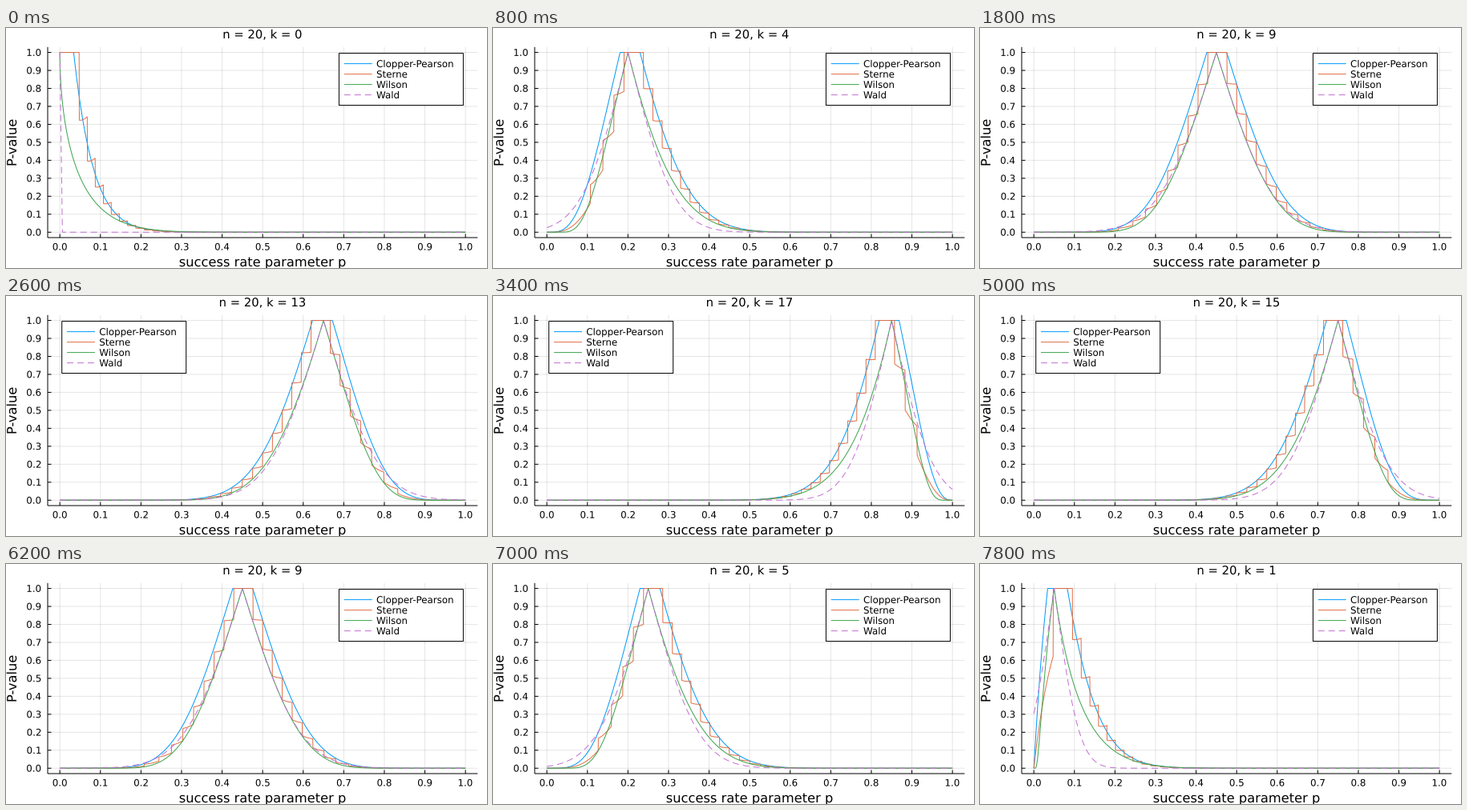
These frames come from a looping animation (600x300 px, 8000 ms). A matplotlib script:

```python
import math

import matplotlib.pyplot as plt
import numpy as np
from matplotlib.animation import FuncAnimation
from matplotlib.patches import PathPatch, Rectangle
from matplotlib.textpath import TextPath
from matplotlib.transforms import Affine2D

W, H, DPI = 600, 300, 100
N = 20
STEP_MS = 200
PX = 72 / DPI                       # points per pixel
DASH = (0, (8 * PX, 5 * PX))
LEFT, RIGHT, TOP, BOTTOM = 52, 588.3, 23.8, 262
TICK = 4.5
SMALL, TITLE, GUIDE = 11.84, 14.8, 16.28
LEGEND_LEFT, LEGEND_RIGHT = 69.7, 415.4
STYLES = [
    ("Clopper-Pearson", "#009AFA", "-"),
    ("Sterne", "#E36F47", "-"),
    ("Wilson", "#3DA44E", "-"),
    ("Wald", "#C371D2", DASH),
]

plt.rcParams.update({
    "path.snap": False,
    "lines.linewidth": PX,
    "lines.scale_dashes": False,
    "lines.solid_capstyle": "butt",
})

p = np.linspace(0, 1, 2001)
pmf = np.array([math.comb(N, j) * p**j * (1 - p) ** (N - j) for j in range(N + 1)])
erfc = np.vectorize(math.erfc)


def two_sided(k, var):
    """Normal two-sided P-value for k successes with the given variance."""
    with np.errstate(divide="ignore", invalid="ignore"):
        z = np.abs(k - N * p) / np.sqrt(var)
    return erfc(np.nan_to_num(z, nan=0.0, posinf=99.0) / math.sqrt(2))


def clopper_pearson(k):
    lower, upper = pmf[: k + 1].sum(axis=0), pmf[k:].sum(axis=0)
    return np.minimum(1, 2 * np.minimum(lower, upper))


def sterne(k):
    return np.where(pmf <= pmf[k] * (1 + 1e-9), pmf, 0).sum(axis=0)


def wilson(k):
    return two_sided(k, N * p * (1 - p))


def wald(k):
    if k in (0, N):                 # zero variance: a narrow spike
        return np.clip(1 - np.abs(p - k / N) / 0.00625, 0, 1)
    return two_sided(k, k * (1 - k / N))


def to_x(v):
    return LEFT + (v + 0.03) / 1.06 * (RIGHT - LEFT)


def to_y(v):
    return BOTTOM - (v + 0.03) / 1.06 * (BOTTOM - TOP)


METHODS = (clopper_pearson, sterne, wilson, wald)
curves = [[to_y(f(k)) for f in METHODS] for k in range(N + 1)]

fig = plt.figure(figsize=(W / DPI, H / DPI), dpi=DPI, facecolor="white")
page = fig.add_axes([0, 0, 1, 1])   # pixel coordinates, y down
page.set(xlim=(0, W), ylim=(H, 0))
page.axis("off")


def glyphs(x, y, text, size, align="center", angle=0):
    """Outline of a text with its baseline at y."""
    path = TextPath((0, 0), text, size=size, prop={"family": "DejaVu Sans"})
    ink = path.get_extents()
    anchor = {"left": 0, "center": (ink.x0 + ink.x1) / 2, "right": ink.x1}[align]
    place = Affine2D().translate(-anchor, 0).scale(1, -1).rotate_deg(-angle)
    return place.translate(x, y).transform_path(path)


def put(*args, **kw):
    return page.add_patch(PathPatch(glyphs(*args, **kw), fc="black", lw=0, zorder=5))


def stroke(xs, ys, color="black", **kw):
    return page.plot(xs, ys, color=color, **kw)[0]


# Grid, axes and labels
for v in np.arange(11) / 10:
    x, y = to_x(v), to_y(v)
    stroke([x, x], [TOP, BOTTOM], alpha=0.1, zorder=1)
    stroke([LEFT, RIGHT], [y, y], alpha=0.1, zorder=1)
    stroke([x, x], [BOTTOM - TICK, BOTTOM])
    stroke([LEFT, LEFT + TICK], [y, y])
    put(x, 277.6, f"{v:.1f}", SMALL)
    put(43.3, y + 4.3, f"{v:.1f}", SMALL, align="right")
stroke([LEFT, RIGHT], [BOTTOM, BOTTOM])
stroke([LEFT, LEFT], [TOP, BOTTOM])
put(320, 298, "success rate parameter p", GUIDE)
put(13, 143, "P-value", GUIDE, angle=90)
title = put(320, 13, "n", TITLE)

lines = [stroke(to_x(p), curves[0][i], color, ls=ls, zorder=3)
         for i, (_, color, ls) in enumerate(STYLES)]

# Legend, moved as a whole by its shift
shift = Affine2D()
legend = [page.add_patch(Rectangle((0, 31.6), 155, 65, fc="white", ec="black",
                                   lw=PX, zorder=4))]
for i, (name, color, ls) in enumerate(STYLES):
    y = 44.6 + 13 * i
    legend.append(stroke([6.3, 41.3], [y, y], color, ls=ls, zorder=5))
    legend.append(put(46.6, y + 4.3, name, SMALL, align="left"))
for part in legend:
    part.set_transform(shift + page.transData)


def update(i):
    k = i if i <= N else 2 * N - i
    title.set_path(glyphs(320, 13, f"n = {N}, k = {k}", TITLE))
    for line, curve in zip(lines, curves[k]):
        line.set_ydata(curve)
    shift.clear().translate(LEGEND_RIGHT if k <= N // 2 else LEGEND_LEFT, 0)
    return [title, *lines, *legend]


anim = FuncAnimation(fig, update, frames=2 * N, interval=STEP_MS,
                     repeat=True, repeat_delay=0, blit=False)
plt.show()
```
